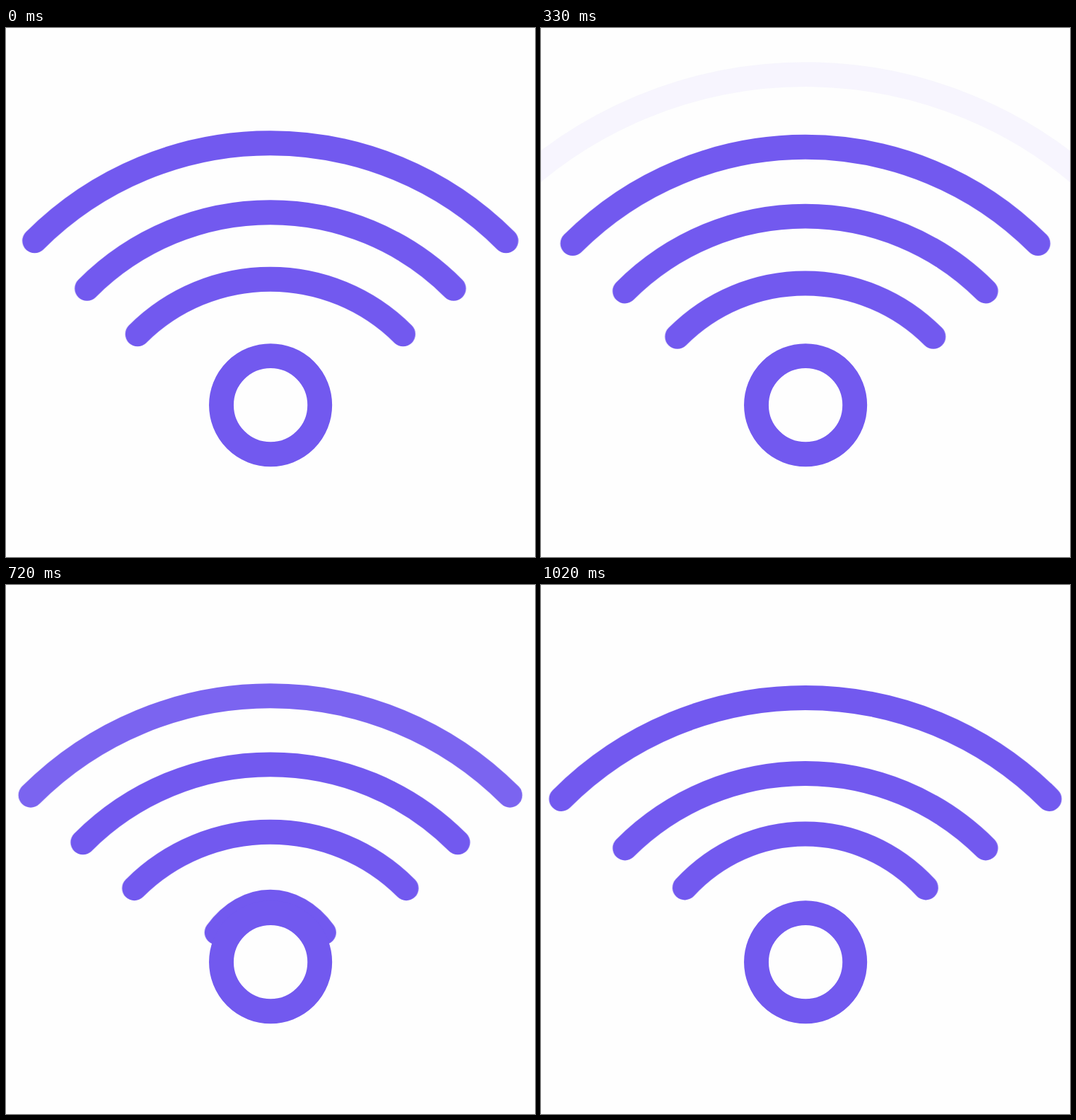
These frames come from a looping animation (748x748 px, 1.05 s). An HTML page:

```html
<!DOCTYPE html>
<html lang="en">
<head>
<meta charset="utf-8">
<title>Signal waves</title>
<style>
  html, body {
    margin: 0;
    width: 100%;
    height: 100%;
    overflow: hidden;
    background: #fefefe;
  }

  svg {
    display: block;
    width: 100vw;
    height: 100vh;
    fill: none;
    stroke: #7259ef;
    stroke-width: 34.9;
    stroke-linecap: round;
  }

  path { animation: 1050ms linear infinite; }
  .emerge { animation: emerge 350ms step-end infinite; }

  @keyframes emerge {
    0% { opacity: 0; }
    4%, 100% { opacity: 1; }
  }
</style>
</head>
<body>
<svg viewBox="0 0 748 748">
  <g transform="translate(373.7 0)">
    <g class="emerge"><path style="animation-name: wave0"/></g>
    <path style="animation-name: wave1"/>
    <path style="animation-name: wave2"/>
    <path style="animation-name: wave3"/>
  </g>
  <circle cx="374.1" cy="533.2" r="69.6"/>
</svg>
<script>
  // Each pose is [top y, half width, end y]; a pulse moves every wave one slot out.
  const slots = [
    [455.5, 68.5, 496],
    [355.5, 187.5, 433],
    [261, 259, 368.5],
    [163, 333, 301],
    [60, 431, 238]
  ];
  // Where the shorter third pulse comes to rest.
  const rests = [
    [352, 170.5, 428],
    [266.5, 255, 372],
    [159.5, 345, 302.5],
    [74.4, 416, 246.5]
  ];

  // A quarter arc, stretched to the width and height of the pose.
  function arc([top, half, end]) {
    const crown = half * 0.375;
    const x = half * 0.735;
    const y = end - (end - top) * 0.64;
    return `path("M${-half} ${end} C${-x} ${y} ${-crown} ${top} 0 ${top}` +
           ` S${x} ${y} ${half} ${end}")`;
  }

  function keyframes(rest, i) {
    const fades = i === rests.length - 1;
    const pose = (p, opacity) => `{ d: ${arc(p)}; opacity: ${opacity}; }`;
    const gone = fades ? 0 : 1;
    return `@keyframes wave${i} {
      0%, 33.334%, 66.667% ${pose(slots[i], 1)}
      33.333%, 66.666% ${pose(slots[i + 1], gone)}
      95.238%, 100% ${pose(rest, gone)}
    }`;
  }

  const sheet = document.createElement("style");
  sheet.textContent = rests.map(keyframes).join("\n");
  document.head.append(sheet);
</script>
</body>
</html>
```
